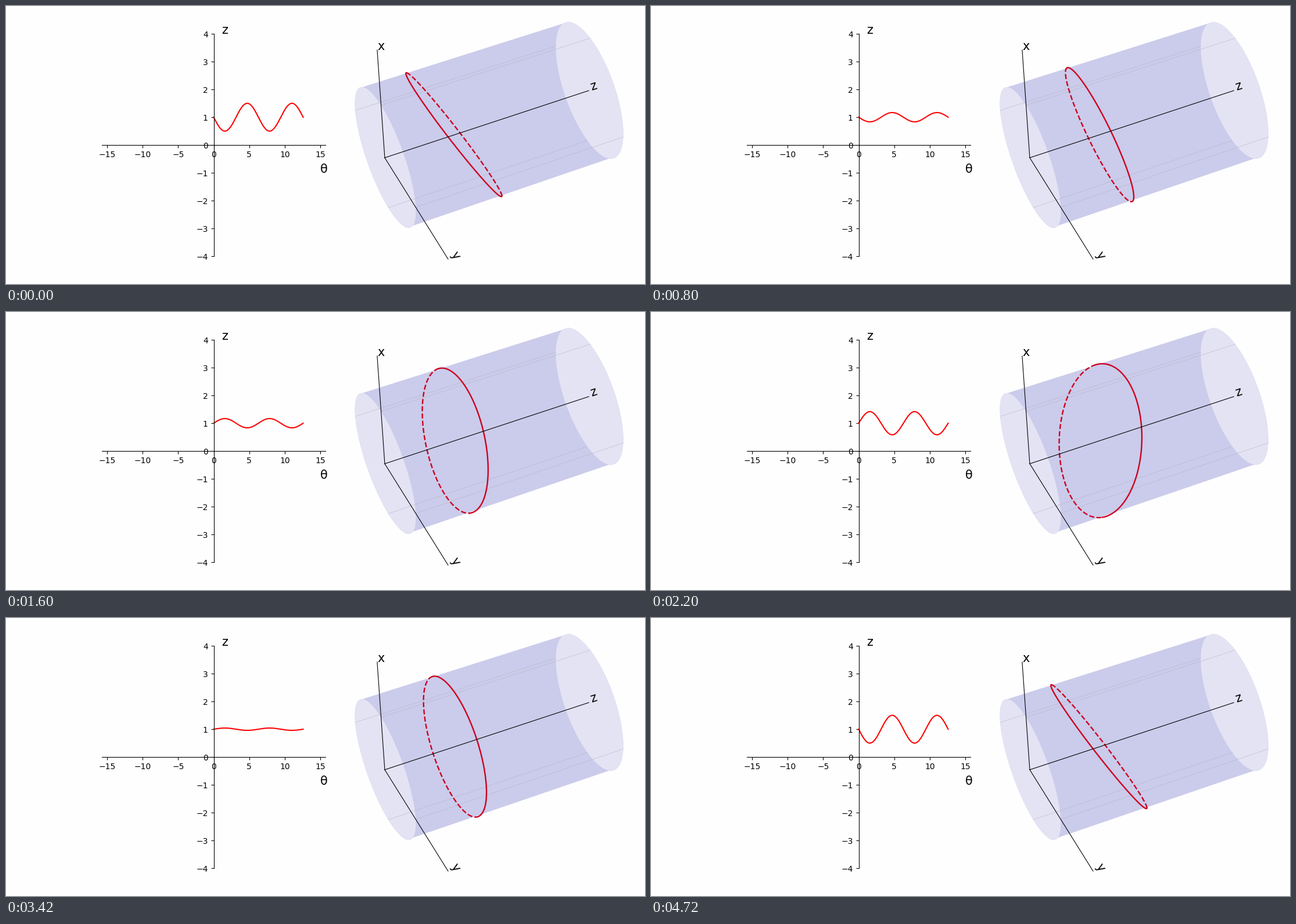
These frames come from a looping animation (1100 by 480 pixels, 4.82 s). A matplotlib script:

```python
import numpy as np
import matplotlib.pyplot as plt
from matplotlib.animation import FuncAnimation

WIDTH, HEIGHT, DPI = 1100, 480, 100
BACK, BODY, OPENING = "#fefefe", "#cbcbeb", "#e3e3f4"
CURVE = "#cd001e"
LENGTH = 3          # length of the unit-radius cylinder
TICK_MS = 20
PEAK = 24           # steps from the lowest to the highest amplitude

plt.rcParams["font.family"] = "DejaVu Sans"

# Perspective camera: rows give screen x, screen y and depth for (x, y, z, 1)
CAMERA = np.array([
    [-22.5, 37.4, 128.4, 652.0],
    [-94.9, 77.7, -37.0, 262.0],
    [-0.025, -0.0225, 0.0113, 1.0],
])


def project(x, y, z):
    points = np.broadcast_arrays(x, y, z, 1.0)
    u, v, w = np.tensordot(CAMERA, np.array(points), axes=1)
    return u / w, v / w


def on_cylinder(theta, z):
    return project(np.sin(theta), np.cos(theta), z)


def amplitude(tick):
    # Steps last five ticks, except the peak, which lasts one
    peak_tick = 5 * PEAK
    step = tick // 5 if tick <= peak_tick else (tick + 4) // 5
    return 0.5 - abs(step - PEAK) / PEAK


fig = plt.figure(figsize=(WIDTH / DPI, HEIGHT / DPI), dpi=DPI, facecolor=BACK)

# Flat graph of z against theta
graph = fig.add_axes([0.15, 0.1, 0.35, 0.8], facecolor="none")
graph.set_xlim(-5 * np.pi, 5 * np.pi)
graph.set_ylim(-4, 4)
graph.set_xticks(range(-15, 16, 5))
graph.set_yticks(range(-4, 5))
for side in ("left", "bottom"):
    graph.spines[side].set_position("zero")
for side in ("right", "top"):
    graph.spines[side].set_visible(False)

theta_flat = np.linspace(0, 4 * np.pi, 200)
wave, = graph.plot(theta_flat, np.ones_like(theta_flat), color="red", lw=1.5)

# Pixel stage for the cylinder, y pointing down
stage = fig.add_axes([0, 0, 1, 1])
stage.set_xlim(0, WIDTH)
stage.set_ylim(HEIGHT, 0)
stage.axis("off")

stage.text(376.6, 47.5, "z", size=15, ha="center")
stage.text(547, 288.3, "θ", size=15, ha="center")

# Outline: back arc of the near rim joined to the front arc of the far rim
edge = np.radians(130)
back_arc = on_cylinder(np.linspace(edge, edge + np.pi, 120), 0)
front_arc = on_cylinder(np.linspace(edge - np.pi, edge, 120), LENGTH)
stage.fill(*np.hstack([back_arc, front_arc]), color=BODY, lw=0, zorder=1)

circle = np.linspace(0, 2 * np.pi, 240)
for z in (0, LENGTH):
    stage.fill(*on_cylinder(circle, z), color=OPENING, lw=0, zorder=1.1)

# Faint seams along the quarter lines
for quarter in range(4):
    seam = on_cylinder(quarter * np.pi / 2, np.array([0, LENGTH]))
    stage.plot(*seam, color="#b4b4c4", alpha=0.55, lw=0.7, zorder=1.2)

# Curve on the cylinder: solid in front, dashed behind
split = 3 * np.pi / 4
theta_front = np.linspace(split - np.pi, split, 120)
theta_rear = np.linspace(split, split + np.pi, 120)
front, = stage.plot([], [], color=CURVE, lw=1.7, zorder=2)
rear, = stage.plot([], [], color=CURVE, lw=1.7, ls="--", zorder=2)

for name, tip, angle in (
    ("x", (2, 0, 0), 0),
    ("y", (0, 2, 0), -58),
    ("z", (0, 0, LENGTH), 18.3),
):
    start, end = project(0, 0, 0), project(*tip)
    stage.plot(*zip(start, end), color="black", lw=0.8, zorder=3)
    stage.text(*end, name, size=15, rotation=angle, zorder=3)


def update(tick):
    a = amplitude(tick)
    wave.set_ydata(1 + a * np.sin(theta_flat))
    for line, theta in ((front, theta_front), (rear, theta_rear)):
        line.set_data(*on_cylinder(theta, 1 + a * np.sin(theta)))
    return wave, front, rear


anim = FuncAnimation(fig, update, frames=241, interval=TICK_MS,
                     repeat=True, repeat_delay=0)
plt.show()
```
